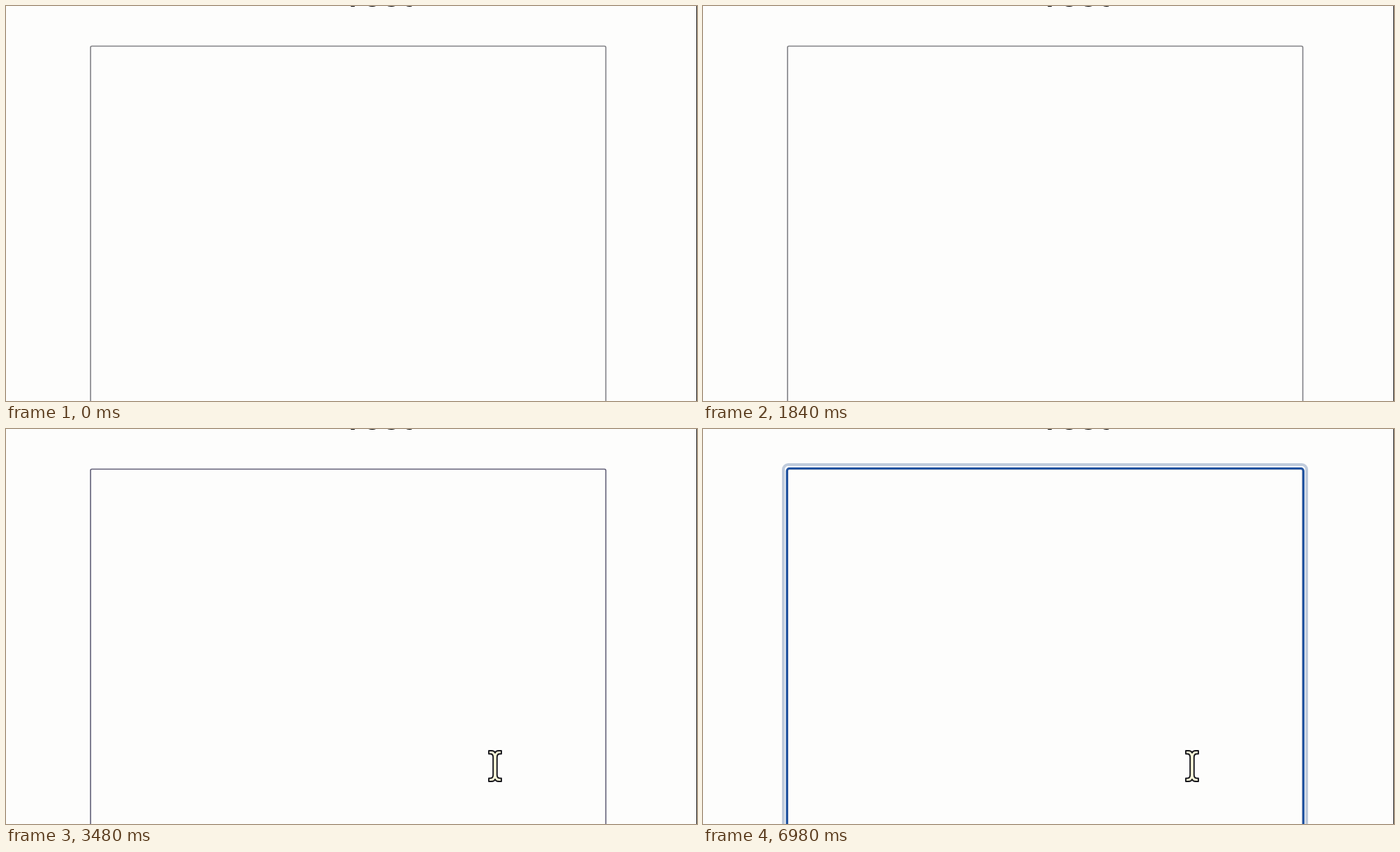
An HTML page for the animation above (8 s loop, 989 by 566 pixels).

```html
<!DOCTYPE html>
<html lang="en">
<head>
<meta charset="utf-8">
<title>Text area focus</title>
<style>
  html, body { margin: 0; width: 100%; height: 100%; overflow: hidden; background: #fdfdfc; }
  svg { display: block; }
  text { font: 500 50px Inter, Arial, sans-serif; text-anchor: middle; }
</style>
</head>
<body>
<svg width="989" height="566" viewBox="0 0 989 566">
  <text x="531" y="1">Test</text>
  <path d="M988.5 0V566" stroke="#222"/>
  <rect id="border" x="121" y="57.5" width="737.5" height="600" rx="2" fill="none" stroke-width="1.6"/>
  <g id="ring" fill="none">
    <rect id="halo" stroke="#bfcbdc" stroke-width="4"/>
    <rect x="120.2" y="56.5" width="739.1" height="600" rx="3.5" stroke="#1f52a0" stroke-width="3.2"/>
  </g>
  <rect id="caret" x="127" y="64" width="2.2" height="26" fill="#111122"/>
  <path id="mouse" fill="#f8f6d8" stroke="#17171c" stroke-width="1.9" stroke-linejoin="round"
    d="M-9 -22h4q4 0 5 3q1 -3 5 -3h4v4.5h-2q-4.2 0 -4.2 5v25q0 5 4.2 5h2v4.5h-4q-4 0 -5 -3q-1 3 -5 3h-4v-4.5h2q4.2 0 4.2 -5v-25q0 -5 -4.2 -5h-2z"/>
</svg>
<script>
const LOOP = 8000;
const el = id => document.getElementById(id);
const [border, ring, halo, caret, mouse] = ['border', 'ring', 'halo', 'caret', 'mouse'].map(el);
const ramp = (t, from, to) => Math.min(1, Math.max(0, (t - from) / (to - from)));
const set = (node, attrs) => {
  for (const key in attrs) node.setAttribute(key, attrs[key]);
};

function draw(t) {
  const focus = t < 2500 ? ramp(t, 1100, 1240) - ramp(t, 1500, 1840) : ramp(t, 3500, 3640);
  const grow = 5 * (1 - focus);
  set(ring, { opacity: focus });
  set(halo, {
    x: 115 - grow, y: 51 - grow,
    width: 749 + 2 * grow, height: 612 + 2 * grow, rx: 7 + grow
  });
  set(border, { stroke: t < 3080 ? '#808085' : '#605e76' });

  const caretOn = (t >= 1180 && t < 1520) || t >= 3580;
  set(caret, { opacity: caretOn ? 1 - ramp(t, 6820, 6980) : 0 });

  // The pointer slides in from below and slows to a stop.
  const left = (1 - ramp(t, 3060, 3480)) ** 2;
  set(mouse, { transform: `translate(${700 + 20 * left} ${483 + 110 * left})` });
}

const start = performance.now();
function tick() {
  draw((performance.now() - start) % LOOP);
  requestAnimationFrame(tick);
}
tick();
</script>
</body>
</html>
```
